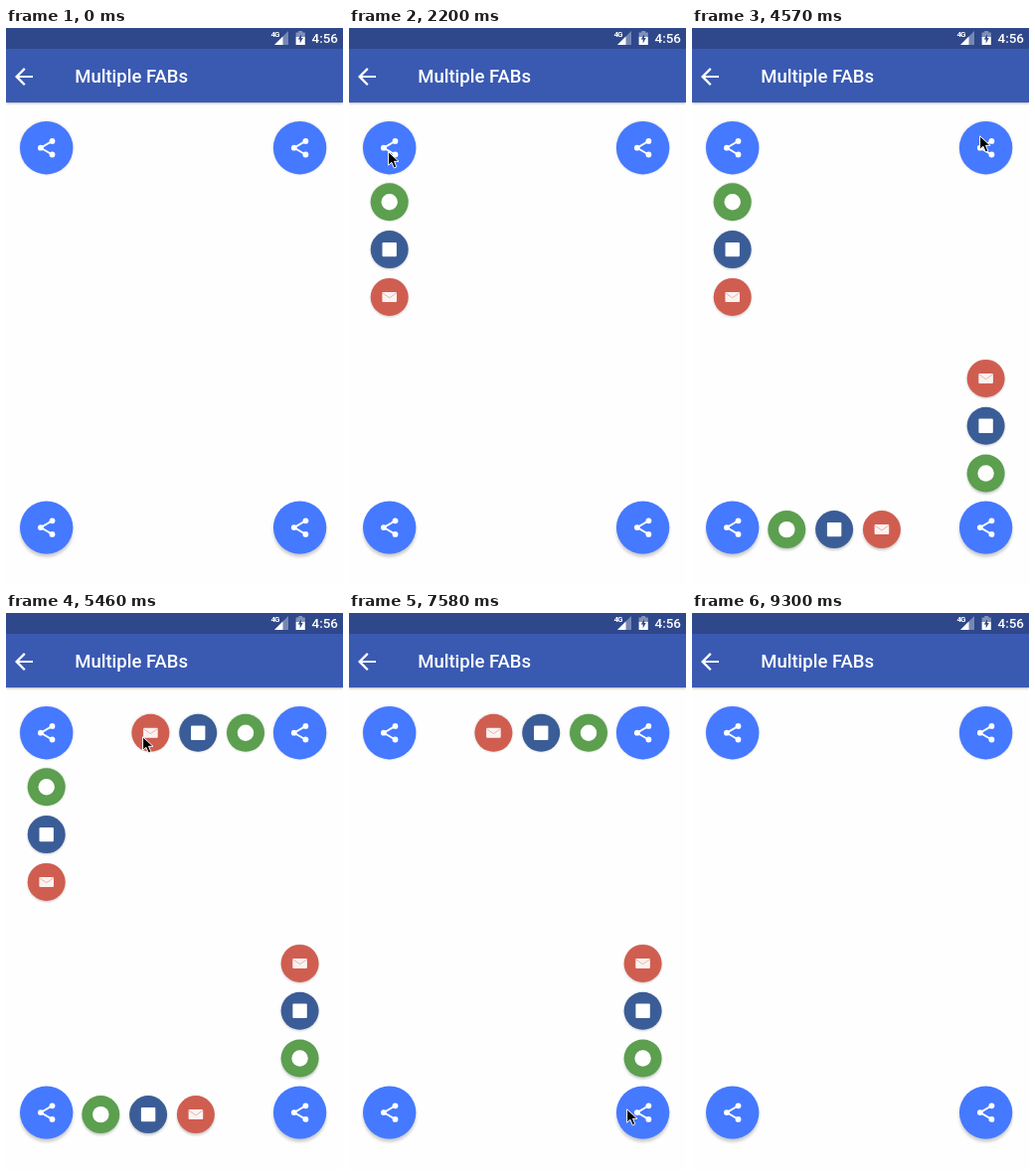
Animation, 339 px wide and 561 px high, one loop 9900 ms. Source, as an HTML page:

```html
<!DOCTYPE html>
<html lang="en">
<head>
<meta charset="utf-8">
<title>Multiple FABs</title>
<style>
html, body { margin: 0; width: 100%; height: 100%; overflow: hidden; background: #fefefe; }
svg { display: block; }
text { font-family: Roboto, sans-serif; font-weight: 500; fill: #fff; }
#bar { filter: drop-shadow(0 1px 1px rgba(0,0,0,.28)); }
</style>
</head>
<body>
<svg width="339" height="561">
  <defs>
    <g id="share" fill="#fff">
      <path d="M5.8-6.8L-5.8 0 5.8 6.8" fill="none" stroke="#fff" stroke-width="1.9"/>
      <circle cx="5.8" cy="-6.8" r="2.9"/><circle cx="-5.8" r="2.9"/><circle cx="5.8" cy="6.8" r="2.9"/>
    </g>
    <circle id="chat" r="8.2" fill="#fff"/>
    <rect id="page" x="-7.2" y="-7.2" width="14.4" height="14.4" rx="1" fill="#fff"/>
    <g id="mail">
      <rect x="-7.3" y="-5" width="14.6" height="10" rx="1" fill="#fbf3f1"/>
      <path d="M-7-4L0 .8 7-4" fill="none" stroke="#e3a49b" stroke-width=".8"/>
    </g>
  </defs>

  <rect id="bar" y="21" width="339" height="54" fill="#3a5ab2"/>
  <rect width="339" height="21" fill="#2f488b"/>
  <path d="M27 48H13.3l6.3-6.3L18 40l-9 9 9 9 1.6-1.6-6.3-6.3H27z" fill="#fff"/>
  <text x="69.2" y="55.2" font-size="18.5">Multiple FABs</text>
  <text x="307.6" y="15" font-size="13.4">4:56</text>
  <text x="266.5" y="9.4" font-size="8" letter-spacing="-1" style="font-weight:700">4G</text>
  <g fill="#fff">
    <path d="M284 3V17H270z" opacity=".35"/>
    <path d="M278.5 8.5V17H270z"/>
    <path d="M294.2 3h4v1.6h2.6V9h-9.2V4.6h2.6z" opacity=".4"/>
    <path d="M291.6 9h9.2v8h-9.2z"/>
    <path d="M297 6.2l-3.2 5.4h1.9v3.8l3-5.4h-1.7z" fill="#2f488b"/>
  </g>

  <g id="buttons"></g>
  <path id="cursor" d="M.6.8V14.2L3.9 11.3 6.3 16.9 8.8 15.8 6.5 10.3H11z" stroke="#fff"/>
</svg>
<script>
const LOOP = 9900;
const LEAD = 28;   // a move has already begun when its first step shows
const FIRST = 54.6, STEP = 47.8;
const colors = { share: '#4579ff', chat: '#5b9f4f', page: '#3b5d97', mail: '#d05e50' };
const buttons = document.getElementById('buttons');
const cursor = document.getElementById('cursor');

// Shadows fall further the lower a button sits and the larger it is.
function button(icon, x, y, r) {
  const drop = r * y / 561 / 8;
  return `<g transform="translate(${x} ${y})">
    <circle r="${r}" fill="${colors[icon]}"
      style="filter:drop-shadow(0 ${.2 + drop}px ${.8 + drop / 5}px rgba(0,0,0,.2))"/>
    <use href="#${icon}"/></g>`;
}

function group(html) {
  const g = document.createElementNS('http://www.w3.org/2000/svg', 'g');
  g.innerHTML = html;
  buttons.append(g);
  return g;
}

const left = 40.7, right = 295.6, top_ = 120.7, bottom = 503.1;
const menus = [
  { x: left, y: top_, dx: 0, dy: 1, open: 2200, close: 6080 },
  { x: left, y: bottom, dx: 1, dy: 0, sag: 2, open: 3200, close: 6940 },
  { x: right, y: bottom, dx: 0, dy: -1, open: 4020, close: 7970 },
  { x: right, y: top_, dx: -1, dy: 0, open: 4890, close: 9010 }
];
for (const m of menus) {
  const minis = ['chat', 'page', 'mail'].map((icon, i) => {
    const d = FIRST + i * STEP;
    return button(icon, m.x + m.dx * d, m.y + m.dy * d + (m.sag || 0), 19);
  });
  m.el = group(minis.join(''));
  group(button('share', m.x, m.y, 26.7));
}

// Cursor stops; bow is how far the way there bulges to the left of its heading.
const entry = { x: 155, y: 565 };
const stops = [
  { from: 1400, to: 1780, x: 39, y: 124 },
  { from: 2470, to: 2750, x: 32, y: 497 },
  { from: 3200, to: 3550, x: 302, y: 501 },
  { from: 4200, to: 4570, x: 289, y: 108, bow: -20 },
  { from: 5190, to: 5640, x: 57, y: 111, bow: 15 },
  { from: 6080, to: 6520, x: 31, y: 499, bow: 1.5 },
  { from: 6940, to: 7210, x: 247, y: 501 },
  { from: 7390, to: 7580, x: 279, y: 499 },
  { from: 8150, to: 8690, x: 295, y: 108 },
  { from: 9010, to: 9300, x: 343, y: 340 }
];
const ease = p => (p + p * p * (3 - 2 * p)) / 2;

function cursorAt(t) {
  const i = stops.findLastIndex(s => s.from <= t);
  if (i < 0 || t >= stops[stops.length - 1].to) return null;
  const a = stops[i - 1] || entry, b = stops[i];
  const u = ease(Math.min(1, (t - b.from + LEAD) / (b.to - b.from + LEAD)));
  const dx = b.x - a.x, dy = b.y - a.y;
  const bulge = 4 * u * (1 - u) * (b.bow || 0) / Math.hypot(dx, dy);
  return [a.x + dx * u + dy * bulge, a.y + dy * u - dx * bulge].map(Math.round);
}

const show = (el, on) => { el.style.visibility = on ? 'visible' : 'hidden'; };

function draw() {
  const t = performance.now() % LOOP;
  for (const m of menus) show(m.el, t >= m.open && t < m.close);
  const at = cursorAt(t);
  show(cursor, at);
  if (at) cursor.setAttribute('transform', `translate(${at})`);
  requestAnimationFrame(draw);
}
draw();
</script>
</body>
</html>
```
